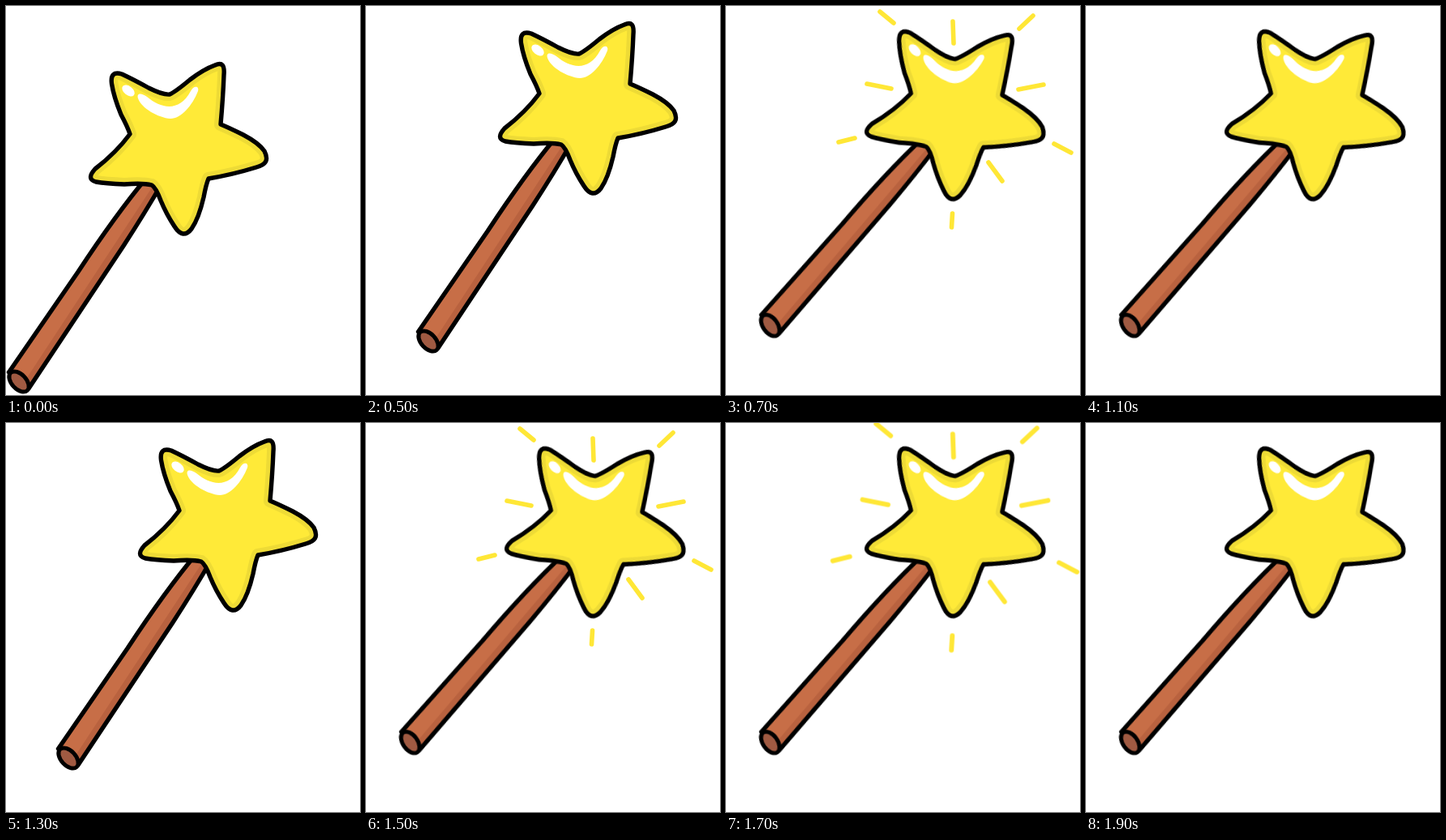
Write an HTML page without scripts that moves like this. It is 437 px wide and 480 px high and loops after 2100 ms.

```html
<!DOCTYPE html>
<html lang="en">
<head>
<meta charset="utf-8">
<title>Magic wand</title>
<style>
  html, body { margin: 0; width: 100%; height: 100%; overflow: hidden; background: #fff; }
  svg { display: block; width: 100%; height: 100%; }

  .wand, .rays { animation: 2100ms step-end infinite; }
  .wand { animation-name: wave; transform-origin: 270.4px 118.6px; }
  .rays { animation-name: shine; transform-origin: 283px 125px; }

  /* rest, lift, tilt (held), lift, tilt (held) */
  @keyframes wave {
    0%, 100% { transform: translate(-61px, 50px); }
    23.809%, 61.904% { transform: none; }
    33.333%, 71.428% { transform: translate(12.6px, 6.8px) rotate(7.1deg); }
  }
  /* hidden, near, spread, hidden, near, spread, hidden */
  @keyframes shine {
    0%, 52.38%, 90.476%, 100% { opacity: 0; transform: none; }
    33.333%, 71.428% { opacity: 1; transform: none; }
    42.857%, 80.952% { opacity: 1; transform: scale(1.05); }
  }

  .ink { fill: none; stroke: #000; stroke-width: 5.4; stroke-linejoin: round; }
  .rays { fill: none; stroke: #ffe736; stroke-width: 5.6; stroke-linecap: round; }
</style>
</head>
<body>
<svg viewBox="0 0 437 480">
  <defs>
    <path id="star" d="M191.5 46 C190 35 194 31 204 34 Q219 41 237 51 Q255 60 263 59
      Q270 56 288 41 Q305 28 319 23 C328 19 331 23 330 35 Q329 62 326 96
      Q338 101 354 109 Q373 119 380 129 C386 141 381 146 370 149 Q341 158 311 163
      Q308 170 305 186 Q299 212 290 225 C283 234 276 233 269 222
      Q259 207 252 190 Q246 174 241 171 Q230 168 207 170 Q184 169 172 167
      C163 164 164 159 171 151 Q197 131 214 108 Q211 99 203 84 Q194 62 191.5 46 Z"/>
    <path id="stick" d="M64.5 402 L150 278 Q196 208 236 160 L254 168 Q232 206 206 246 L89 422 Z"/>
    <clipPath id="inStar"><use href="#star"/></clipPath>
    <clipPath id="inStick"><use href="#stick"/></clipPath>
  </defs>

  <g class="wand">
    <use href="#stick" fill="#c76e47"/>
    <path d="M250 174 L87 422" clip-path="url(#inStick)" fill="none" stroke="#b9623f" stroke-width="15"/>
    <use href="#stick" class="ink"/>
    <ellipse cx="77" cy="413.5" rx="15" ry="9" transform="rotate(47 77 413.5)"
      fill="#a05a42" stroke="#000" stroke-width="5"/>

    <use href="#star" fill="#ffea38"/>
    <g clip-path="url(#inStar)">
      <use href="#star" fill="none" stroke="#eedb36" stroke-width="16" stroke-linejoin="round"/>
    </g>
    <use href="#star" class="ink"/>
    <g fill="#fff">
      <ellipse cx="212" cy="54.5" rx="8.8" ry="5.5" transform="rotate(38 212 54.5)"/>
      <path d="M224 64 C222 57 228 57 235 62 C253 77 275 81 289 55 C293 47 300 49 298 55
        C291 73 277 89 264 89 C249 88 228 76 224 64 Z"/>
    </g>
  </g>

  <path class="rays" d="M190 7 L207 21 M280 19 L281 46 M379 12 L362 28
    M174 96 L204 102 M361 103 L392 97 M139 168 L159 163
    M405 170 L426 181 M324 193 L341 216 M279.5 256 L278.5 273"/>
</svg>
</body>
</html>
```
